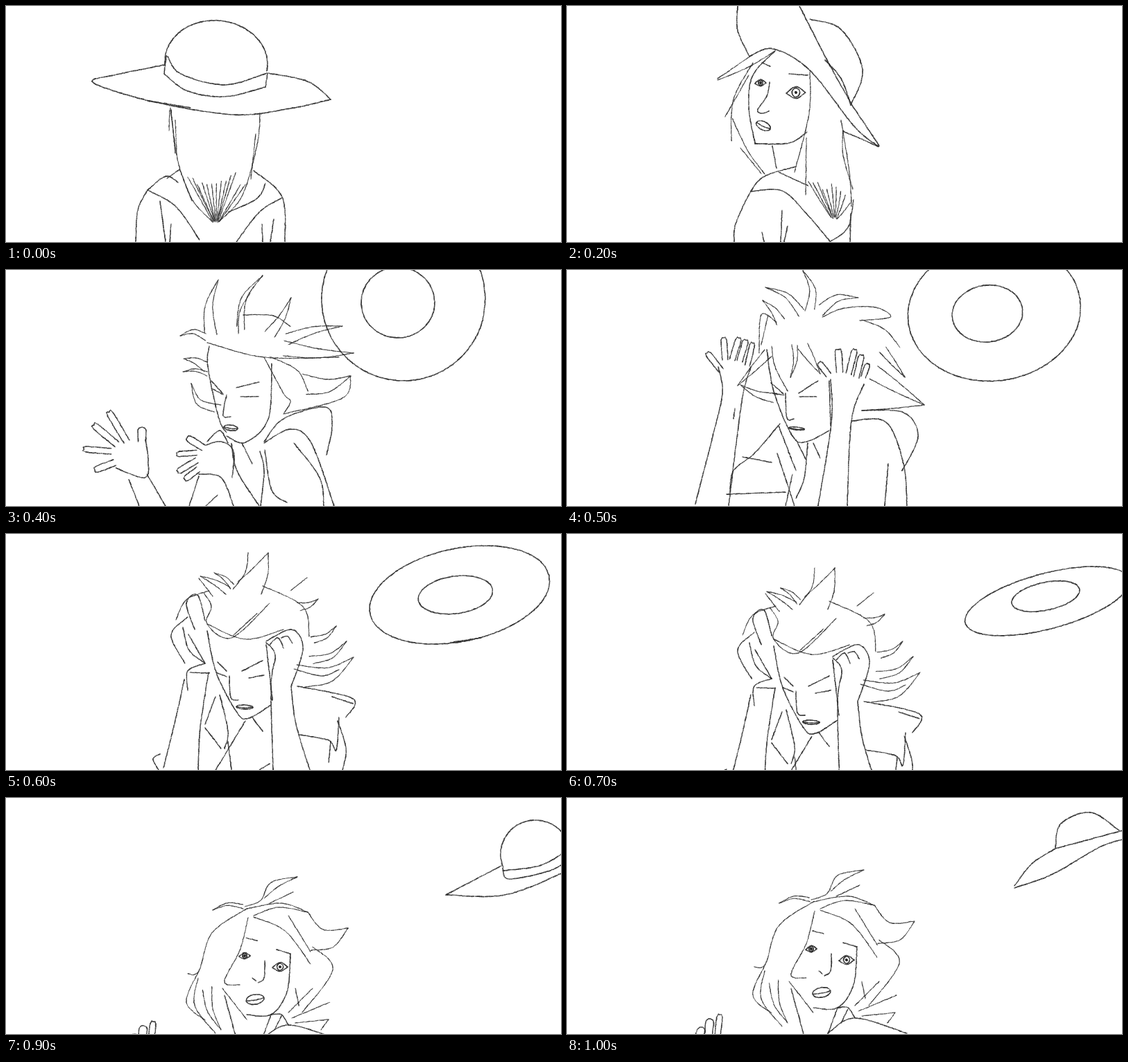
An HTML page with a canvas for the animation above (1200 ms loop, 800 by 341 pixels).

```html
<!DOCTYPE html>
<html lang="en">
<head>
<meta charset="utf-8">
<title>Hat in the wind</title>
<style>
html, body { margin: 0; height: 100%; overflow: hidden; background: #fff; }
canvas { display: block; }
</style>
</head>
<body>
<canvas id="stage" width="800" height="341"></canvas>
<script>
const ctx = stage.getContext("2d");
const rad = Math.PI / 180;
let seed, weight;
const random = () => (seed = seed * 16807 % 2147483647) / 2147483647;

const spline = (a, b, c, d, t) =>
  b + t * (c - a + t * (2 * a - 5 * b + 4 * c - d + t * (3 * b - 3 * c + d - a))) / 2;

// Short grainy dashes along a smooth curve through the points give a pencil line.
function curve(...n) {
  const points = [];
  for (let i = 0; i < n.length; i += 2) points.push([n[i], n[i + 1]]);
  let [x, y] = points[0];
  for (let i = 0; i < points.length - 1; i++) {
    const b = points[i], c = points[i + 1], a = points[i - 1] || b, d = points[i + 2] || c;
    const steps = Math.ceil(Math.hypot(c[0] - b[0], c[1] - b[1]) / 2.5);
    for (let s = 1; s <= steps; s++) {
      const [nx, ny] = [0, 1].map(k => spline(a[k], b[k], c[k], d[k], s / steps) + (random() - .5) * .6);
      ctx.strokeStyle = `rgba(45,45,45,${.55 + .4 * random()})`;
      ctx.lineWidth = weight * (.75 + .5 * random());
      ctx.beginPath();
      ctx.moveTo(x, y);
      ctx.lineTo(nx, ny);
      ctx.stroke();
      [x, y] = [nx, ny];
    }
  }
}

function oval(cx, cy, rx, ry, tilt = 0, from = 0, to = 360) {
  const n = [], cos = Math.cos(tilt * rad), sin = Math.sin(tilt * rad);
  for (let i = 0; i <= 24; i++) {
    const a = (from + (to - from) * i / 24) * rad, x = rx * Math.cos(a), y = ry * Math.sin(a);
    n.push(cx + x * cos - y * sin, cy + x * sin + y * cos);
  }
  curve(...n);
}

// Strands from a row of roots to one tip.
function fan(x0, y0, x1, y1, x, y, count) {
  for (let i = 0; i < count; i++) {
    const t = i / (count - 1), jump = 20 * random() - 10;
    const rx = x0 + (x1 - x0) * t, ry = y0 + (y1 - y0) * t + jump;
    curve(rx, ry, rx * .45 + x * .55 + (t - .5) * 8, (ry + y) / 2, x + (t - .5) * 9, y - 4 * random());
  }
}

// A tapering lock of hair; bend bows it to the right of its direction.
function lock(x, y, tx, ty, width, bend) {
  const len = Math.hypot(tx - x, ty - y), nx = (y - ty) / len, ny = (tx - x) / len;
  for (const side of [-.5, .5]) {
    const root = side * width, mid = root * .6 + bend;
    curve(x + nx * root, y + ny * root, (x + tx) / 2 + nx * mid, (y + ty) / 2 + ny * mid, tx, ty);
  }
}

function finger(x, y, tx, ty, width) {
  const len = Math.hypot(tx - x, ty - y), ux = (tx - x) / len, uy = (ty - y) / len, w = width / 2;
  curve(x + uy * w, y - ux * w, tx + uy * w, ty - ux * w, tx + ux * w * .7, ty + uy * w * .7,
    tx - uy * w, ty + ux * w, x - uy * w, y + ux * w);
}

function eye(x, y, r) {
  curve(x - r, y + 1, x, y - r * .6, x + r, y);
  curve(x - r, y + 1, x, y + r * .6, x + r, y);
  oval(x, y, r * .4, r * .45);
  oval(x, y, 1, 1);
}

function mouth(x, y, w, h, tilt) {
  oval(x, y, w, h, tilt);
  curve(x - w * Math.cos(tilt * rad), y - w * Math.sin(tilt * rad), x, y + 1,
    x + w * Math.cos(tilt * rad), y + w * Math.sin(tilt * rad));
}

const back = {
  hat() {
    oval(303, 82, 74, 61, 5, 170, 365);
    curve(233, 73, 252, 98, 315, 114, 376, 97);
    curve(231, 72, 228, 98);
    curve(228, 98, 262, 123, 316, 131, 374, 117);
    curve(377, 97, 374, 117);
    curve(229, 85, 160, 99, 126, 111, 215, 139, 330, 157, 410, 148, 468, 135);
    curve(378, 97, 435, 109, 468, 135);
    curve(205, 137, 266, 147);
  },
  hair() {
    curve(237, 147, 248, 225, 268, 282);
    curve(236, 150, 235, 180);
    curve(238, 150, 244, 213);
    curve(244, 165, 246, 215);
    curve(366, 156, 362, 200, 340, 275, 305, 313);
    curve(360, 185, 353, 250);
    curve(250, 235, 270, 282, 298, 312);
    fan(262, 255, 345, 248, 303, 313, 13);
  },
  body() {
    curve(250, 236, 232, 249);
    curve(248, 255, 230, 246, 204, 266);
    curve(204, 266, 245, 290, 279, 338);
    curve(204, 266, 190, 295, 187, 341);
    curve(357, 238, 398, 276, 402, 341);
    curve(398, 277, 365, 298, 332, 341);
    curve(374, 256, 362, 278, 320, 298);
    curve(222, 282, 230, 341);
    curve(238, 315, 236, 341);
    curve(369, 315, 370, 341);
    curve(386, 308, 381, 341);
  }
};

const glance = {
  hat() {
    curve(350, 19, 395, 34, 426, 92, 409, 143);
    curve(372, 78, 395, 105, 409, 143);
    curve(246, 0, 246, 35, 263, 73);
    curve(335, 0, 378, 84, 410, 141);
    curve(263, 73, 297, 62, 350, 93, 415, 175, 449, 203);
    curve(410, 142, 450, 202);
    curve(449, 203, 398, 181);
  },
  hair() {
    curve(217, 105, 268, 70);
    curve(217, 107, 262, 88, 300, 65);
    curve(268, 82, 240, 135, 237, 195);
    curve(262, 100, 228, 160);
    curve(238, 162, 260, 208, 285, 243);
    curve(250, 205, 280, 242);
    curve(350, 95, 349, 155, 328, 240);
    curve(345, 190, 344, 273);
    curve(395, 165, 407, 240, 410, 290);
    curve(398, 180, 398, 215, 412, 265);
    fan(348, 245, 408, 275, 385, 308, 10);
  },
  body() {
    curve(300, 65, 268, 100, 262, 145, 271, 199);
    curve(271, 199, 320, 198, 346, 182);
    curve(281, 82, 293, 87);
    curve(320, 98, 347, 100);
    eye(279, 111, 8);
    eye(330, 125, 14);
    curve(292, 110, 288, 130, 275, 150, 281, 155, 291, 152);
    mouth(283, 173, 11, 6, 25);
    curve(296, 202, 302, 235);
    curve(330, 232, 285, 246, 265, 268, 243, 315, 241, 341);
    curve(265, 268, 310, 267, 345, 300, 380, 341);
    curve(305, 240, 348, 260);
    curve(413, 280, 405, 320, 380, 340);
    curve(409, 300, 408, 341);
    curve(310, 295, 308, 341);
    curve(318, 318, 313, 341);
    curve(281, 327, 284, 341);
  }
};

const gust = {
  hat() {
    oval(573, 42, 118, 118);
    oval(565, 47, 53, 51);
  },
  hair() {
    lock(295, 92, 306, 14, 18, -8);
    lock(338, 84, 370, 8, 12, -12);
    curve(335, 92, 337, 60, 352, 33);
    lock(380, 93, 411, 40, 16, 3);
    lock(405, 100, 485, 81, 16, -4);
    lock(400, 113, 501, 120, 22, 4);
    lock(288, 97, 251, 95, 10, 7);
    lock(288, 140, 256, 128, 14, 3);
    lock(290, 150, 255, 147, 6, 4);
    lock(305, 200, 267, 164, 14, -12);
    lock(430, 165, 497, 153, 30, 8);
    curve(290, 105, 372, 126, 480, 126);
    curve(342, 65, 385, 66, 410, 82);
    curve(372, 126, 400, 178, 410, 190, 400, 208);
    curve(380, 125, 420, 145, 435, 175);
    curve(497, 153, 485, 185, 400, 208);
  },
  body() {
    curve(293, 110, 291, 140, 307, 215, 318, 235);
    curve(318, 240, 345, 249, 378, 215, 383, 135);
    curve(296, 160, 313, 179);
    curve(298, 172, 313, 180);
    curve(332, 170, 365, 162);
    curve(338, 183, 364, 183);
    curve(318, 180, 313, 210, 324, 212);
    mouth(324, 228, 10, 4, 8);

    finger(196, 248, 196, 231, 11);
    finger(174, 248, 150, 208, 9);
    finger(160, 252, 129, 226, 9);
    finger(152, 262, 115, 259, 8);
    finger(157, 278, 131, 288, 9);
    curve(201, 245, 205, 275, 200, 300, 158, 286);
    curve(177, 303, 192, 341);
    curve(203, 295, 230, 341);

    finger(285, 257, 264, 244, 9);
    finger(275, 264, 249, 266, 7);
    finger(275, 275, 250, 290, 8);
    finger(277, 288, 260, 301, 8);
    curve(288, 253, 310, 248, 328, 262, 326, 300);
    curve(278, 295, 310, 300, 328, 341);
    curve(278, 298, 264, 341);

    curve(290, 248, 308, 232, 320, 250);
    curve(325, 250, 333, 290, 365, 341);
    curve(366, 262, 372, 290, 367, 341);
    curve(340, 250, 355, 280);
    curve(372, 250, 410, 230, 440, 250, 473, 341);
    curve(372, 248, 400, 215, 460, 198, 470, 225, 462, 267);
    curve(373, 260, 383, 318, 405, 336);
    curve(415, 250, 452, 300, 458, 341);
    curve(305, 325, 288, 341);
  }
};

const clutch = {
  hat() {
    oval(616, 60, 125, 100, -8);
    oval(606, 63, 51, 41, -8);
  },
  hair() {
    lock(308, 75, 282, 44, 14, 3);
    lock(338, 62, 286, 25, 12, 8);
    lock(350, 58, 340, 1, 14, 9);
    lock(366, 58, 420, 40, 16, -9);
    curve(368, 68, 400, 55, 445, 54, 466, 68, 422, 73);
    curve(425, 72, 458, 86, 480, 112);
    curve(302, 75, 280, 65, 277, 120);
    curve(290, 65, 280, 108);
    lock(290, 120, 246, 167, 14, 0);
    lock(300, 185, 250, 166, 14, -4);
    curve(295, 110, 300, 140, 318, 175);
    lock(328, 108, 322, 155, 8, -4);
    lock(340, 110, 365, 150, 16, 0);
    lock(455, 115, 487, 155, 12, 0);
    lock(442, 148, 515, 195, 22, 0);
    curve(515, 195, 470, 200, 425, 203);
  },
  body() {
    curve(288, 115, 298, 175, 325, 240, 345, 248, 378, 232);
    curve(378, 160, 380, 225);
    curve(294, 163, 312, 179);
    curve(296, 178, 313, 181);
    curve(334, 178, 362, 160);
    curve(335, 183, 360, 183);
    curve(315, 178, 317, 214, 327, 215);
    mouth(331, 229, 11, 2, 5);

    finger(222, 145, 204, 122, 8);
    finger(228, 130, 226, 101, 8);
    finger(238, 130, 247, 101, 8);
    finger(249, 132, 257, 104, 8);
    finger(260, 138, 267, 108, 7);
    curve(218, 140, 224, 178, 210, 240, 185, 338);
    curve(265, 140, 252, 190, 233, 341);
    curve(242, 200, 240, 215);

    finger(377, 152, 365, 136, 8);
    finger(393, 148, 391, 118, 9);
    finger(406, 150, 414, 118, 8);
    finger(417, 155, 424, 126, 8);
    finger(427, 155, 433, 138, 7);
    curve(380, 158, 381, 220, 362, 341);
    curve(428, 165, 410, 218, 404, 341);

    curve(410, 218, 460, 220, 485, 280, 490, 341);
    curve(425, 203, 485, 206, 506, 240, 483, 290);
    curve(463, 280, 458, 341);
    curve(307, 222, 270, 265, 240, 290, 235, 320);
    curve(253, 270, 295, 278);
    curve(230, 324, 315, 321);
    curve(305, 225, 330, 290);
    curve(303, 265, 328, 341);
    curve(325, 295, 315, 341);
    curve(330, 245, 345, 275);
    curve(347, 250, 342, 300, 330, 330);
    curve(355, 250, 365, 272);
  }
};

const bow = {
  hat() {
    oval(654, 88, 132, 67, -12);
    oval(648, 88, 54, 27, -8);
    curve(640, 157, 685, 150);
  },
  hair() {
    curve(349, 27, 345, 55, 327, 80);
    lock(351, 78, 378, 27, 38, 3);
    lock(320, 82, 280, 61, 12, 2);
    lock(326, 76, 300, 56, 8, 3);
    curve(278, 64, 298, 90);
    curve(293, 82, 260, 95, 245, 124);
    curve(370, 75, 428, 105, 437, 148);
    lock(422, 105, 450, 94, 12, 3);
    curve(410, 82, 434, 63);
    curve(285, 85, 296, 105, 290, 130, 325, 150, 380, 100);
    curve(328, 146, 362, 115);
    curve(290, 130, 345, 152, 400, 138);
    lock(442, 153, 476, 133, 10, 5);
    lock(440, 182, 491, 155, 12, 8);
    lock(425, 205, 501, 178, 34, 12);
    curve(415, 195, 455, 205, 480, 196);
  },
  body() {
    curve(290, 140, 303, 200, 333, 258, 350, 266, 382, 247);
    curve(375, 160, 384, 240);
    curve(305, 185, 318, 198);
    curve(303, 200, 318, 206);
    curve(340, 198, 370, 183);
    curve(350, 208, 372, 204);
    curve(322, 205, 324, 236, 335, 240);
    mouth(344, 250, 12, 3, 2);

    curve(287, 125, 276, 88, 260, 100, 272, 138);
    curve(262, 120, 238, 146, 258, 187);
    curve(255, 135, 264, 168, 287, 187);
    curve(263, 145, 287, 187);
    curve(287, 187, 262, 198, 262, 226);
    curve(257, 210, 245, 265, 227, 338);
    curve(292, 200, 280, 280, 277, 341);
    curve(265, 200, 293, 201);

    curve(375, 155, 412, 138, 428, 165, 411, 220);
    curve(411, 220, 418, 275, 438, 341);
    curve(380, 160, 392, 150, 400, 165);
    curve(397, 150, 406, 148, 413, 158);
    curve(375, 157, 388, 175, 382, 220, 385, 341);

    curve(420, 220, 500, 238, 490, 265);
    curve(470, 235, 500, 245);
    curve(422, 290, 465, 298, 476, 312, 480, 265);
    curve(478, 270, 490, 310, 485, 341);
    curve(468, 300, 465, 330);
    curve(302, 235, 287, 275);
    curve(308, 232, 320, 285, 315, 310);
    curve(345, 270, 318, 315, 302, 341);
    curve(320, 300, 325, 341);
    curve(355, 265, 370, 285);
    curve(222, 318, 212, 325, 220, 341);
    curve(287, 280, 310, 310);
    curve(380, 332, 365, 341);
  }
};

const peek = {
  hat() {
    oval(749, 90, 50, 49, 0, 157, 345);
    curve(702, 114, 760, 105, 812, 72);
    curve(702, 110, 712, 126, 775, 112, 812, 86);
    curve(700, 107, 620, 149);
    curve(620, 149, 710, 148, 812, 106);
  },
  hair() {
    curve(330, 150, 360, 130, 378, 100);
    lock(388, 131, 397, 90, 24, 2);
    curve(360, 133, 378, 115);
    curve(362, 175, 390, 138);
    curve(400, 130, 432, 165);
    curve(293, 165, 300, 145, 315, 130, 328, 150);
    curve(330, 150, 325, 122);
    curve(312, 140, 303, 160, 312, 185);
    lock(308, 185, 258, 200, 10, 6);
    lock(298, 200, 263, 244, 16, 4);
    curve(308, 210, 340, 193, 385, 192);
    curve(432, 165, 465, 171, 490, 155);
    curve(490, 155, 483, 172, 465, 195);
    curve(465, 195, 500, 213, 512, 238);
    lock(460, 240, 512, 238, 24, 4);
    curve(462, 228, 500, 245);
    lock(388, 198, 407, 225, 10, 0);
    curve(308, 210, 303, 260);
    curve(315, 210, 325, 260);
  },
  body() {
    curve(313, 208, 328, 285, 365, 320, 415, 285);
    curve(322, 235, 330, 231, 343, 237);
    curve(368, 232, 380, 226, 395, 228);
    eye(335, 253, 10);
    eye(386, 254, 11);
    curve(348, 245, 345, 280, 353, 284);
    mouth(368, 303, 12, 6, 8);

    curve(272, 210, 261, 341);
    curve(295, 220, 293, 341);
    curve(305, 255, 296, 285);
    curve(295, 280, 325, 290);
    curve(305, 285, 310, 341);
    curve(312, 290, 328, 341);
    curve(335, 290, 342, 341);
    curve(370, 325, 385, 337);
    curve(395, 328, 425, 325);

    curve(397, 235, 420, 223, 440, 260, 458, 290, 468, 341);
    curve(395, 240, 420, 242);
    curve(397, 250, 418, 258);
    curve(395, 245, 392, 262, 418, 272, 424, 341);
    curve(420, 270, 437, 300, 437, 341);
    curve(455, 262, 500, 265, 500, 293);
    curve(485, 262, 507, 341);
  }
};

const look = {
  hat() {
    curve(704, 73, 712, 37, 755, 21, 796, 47);
    curve(704, 73, 812, 44);
    curve(704, 73, 670, 95, 645, 127);
    curve(645, 130, 700, 110, 770, 70, 812, 58);
  },
  hair() {
    lock(350, 147, 306, 152, 6, 6);
    curve(352, 147, 375, 138, 390, 112, 428, 104);
    curve(380, 135, 400, 118, 428, 104);
    curve(388, 142, 422, 126);
    curve(355, 150, 405, 142, 443, 155);
    curve(365, 160, 400, 148, 443, 155);
    curve(355, 150, 305, 185, 286, 240, 270, 244);
    curve(357, 163, 345, 210, 323, 255, 345, 260);
    curve(365, 162, 410, 182, 447, 230);
    curve(415, 160, 447, 212);
    curve(443, 155, 465, 180, 501, 178);
    curve(501, 178, 480, 205, 448, 210);
    curve(450, 205, 479, 238, 435, 300);
    curve(286, 240, 268, 285, 295, 311);
    curve(285, 250, 280, 290, 310, 330);
    lock(298, 265, 318, 325, 14, 6);
    curve(320, 265, 355, 310);
    curve(415, 300, 450, 265);
    curve(420, 308, 475, 285);
    curve(425, 315, 473, 310);
    curve(425, 265, 430, 290);
    curve(473, 310, 462, 325);
  },
  body() {
    curve(418, 215, 413, 270, 390, 303, 355, 303);
    curve(354, 192, 370, 196);
    curve(398, 209, 418, 215);
    eye(352, 218, 8);
    eye(403, 234, 11);
    curve(381, 225, 380, 250, 371, 257);
    curve(363, 250, 368, 254);
    mouth(367, 281, 13, 7, -10);

    curve(323, 275, 341, 341);
    curve(390, 303, 376, 341);
    curve(390, 303, 405, 303, 415, 318);
    curve(376, 340, 415, 318, 490, 340);
    curve(405, 305, 395, 325);
    finger(190, 345, 194, 335, 11);
    finger(204, 340, 206, 323, 11);
    finger(217, 342, 220, 316, 8);
  }
};

function rising() {
  oval(502, 32, 112, 122, 20);
  oval(488, 40, 52, 54, 10);
}

function tipping() {
  oval(692, 97, 122, 40, -15);
  oval(690, 90, 50, 20, -12);
}

// One drawing per 100 ms; the last stays for 200 ms.
const drawings = [
  { pose: back },
  { pose: back, shift: [14, 6], turn: 2, hatShift: [18, -6], hatTurn: 10 },
  { pose: glance },
  { pose: gust, shift: [-14, 18], hat: rising },
  { pose: gust },
  { pose: clutch },
  { pose: bow },
  { pose: bow, shift: [8, 22], hat: tipping },
  { pose: peek },
  { pose: look, shift: [-8, 10], hat: peek.hat, hatShift: [14, -9] },
  { pose: look }
];

function part(sketch, lineWeight, [dx, dy] = [0, 0], turn = 0, pivot = 341) {
  weight = lineWeight;
  ctx.save();
  ctx.translate(300 + dx, pivot + dy);
  ctx.rotate(turn * rad);
  ctx.translate(-300, -pivot);
  sketch();
  ctx.restore();
}

function draw({ pose, shift, turn, hat = pose.hat, hatShift, hatTurn }) {
  seed = 77;
  ctx.fillStyle = "#fff";
  ctx.fillRect(0, 0, 800, 341);
  part(hat, 1.6, hatShift, hatTurn, 90);
  part(pose.hair, 1.2, shift, turn);
  part(pose.body, 1.5, shift, turn);
}

ctx.lineCap = "round";
let shown = -1;
function tick() {
  const index = Math.min(drawings.length - 1, Math.floor(performance.now() % 1200 / 100));
  if (index !== shown) draw(drawings[shown = index]);
  requestAnimationFrame(tick);
}
tick();
</script>
</body>
</html>
```
